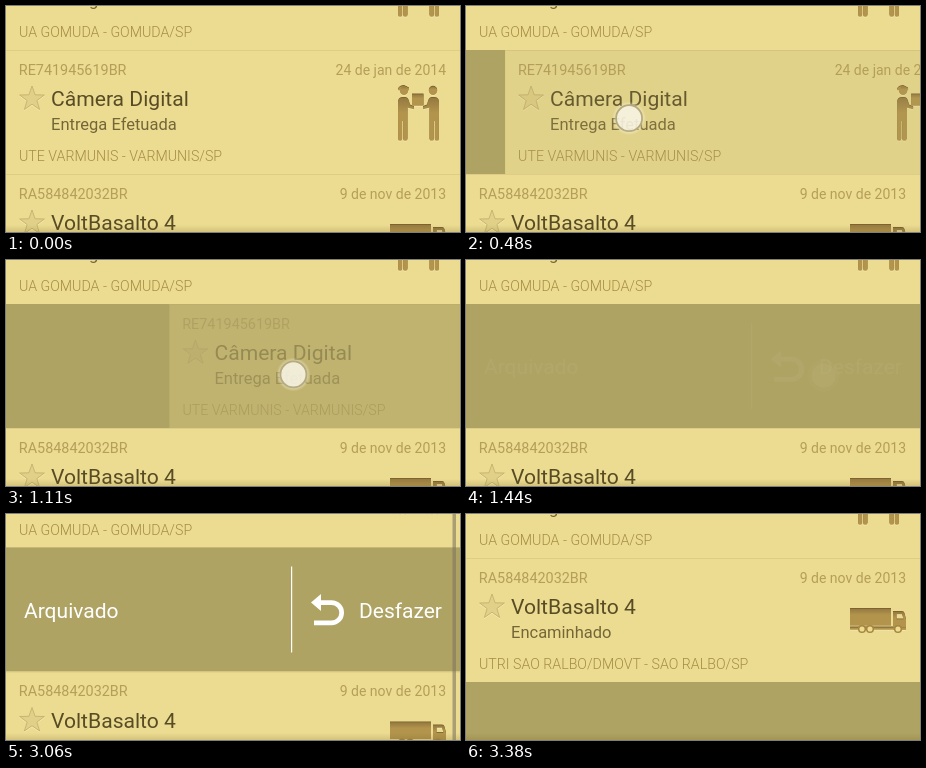
An HTML page for the animation above (3910 ms loop, 454 by 226 pixels).

```html
<!DOCTYPE html>
<html lang="pt">
<head>
<meta charset="utf-8">
<title>Arquivar encomenda</title>
<style>
  html, body { margin: 0; width: 100%; height: 100%; overflow: hidden; background: #afa364; }
  svg { display: block; width: 454px; height: 226px; font-family: Roboto, "Noto Sans", sans-serif; }
  .small { font-size: 14px; fill: #b59e58; }
  .code { font-size: 14.4px; }
  .place { font-size: 14.2px; font-weight: 300; fill: #a78d44; }
  .title { font-size: 21.1px; fill: #584c25; }
  .sub { font-size: 16.5px; fill: #746636; }
  .bar { font-size: 21px; fill: #fff; }
  .end { text-anchor: end; }
</style>
</head>
<body>
<svg viewBox="0 0 454 226">
  <defs>
    <radialGradient id="glow">
      <stop offset=".78" stop-color="#fffbe0" stop-opacity=".45"/>
      <stop offset="1" stop-color="#fffbe0" stop-opacity="0"/>
    </radialGradient>
    <linearGradient id="shade" x2="0" y2="1">
      <stop offset="0" stop-color="#6b5a1c" stop-opacity="0"/>
      <stop offset="1" stop-color="#6b5a1c" stop-opacity=".2"/>
    </linearGradient>
    <linearGradient id="face" x2="0" y2="1">
      <stop offset="0" stop-color="#957940"/>
      <stop offset=".35" stop-color="#b2944c"/>
    </linearGradient>
    <g id="person">
      <circle cx="398" cy="40" r="4.2"/>
      <path d="M392 52q0-5 5-5h2q3 0 4 4l1 3.500 4 1.500v2.500l-6-1.500-.5-1v32.500q0 1.500-2.200 1.500t-2.200-1.500v-18h-1v18q0 1.500-2 1.500t-2-1.500z"/>
    </g>
    <g id="people">
      <path d="M392 38.500q1.500-3.500 6-3.500l5 2.500v2h-11z"/>
      <use href="#person"/>
      <use href="#person" transform="matrix(-1 0 0 1 825 0)"/>
      <path d="M406 43.500h11.500v11.500h-11.500z"/>
    </g>
    <g id="truck">
      <path d="M384 50h41v17h-41z"/>
      <path fill-rule="evenodd" d="M427 53h9q2 0 2.500 2l1.500 6v10h-13zM430.500 55.500v5h7l-1.500-5z"/>
      <path d="M384 68.500h56v2.500h-56z"/>
    </g>
    <path id="arrow" d="M305 55l10-8.500v6.200h10.500a11.300 11.300 0 0 1 0 25h-17.500v-4.700h17.500a7.800 7.800 0 0 0 0-15.600h-10.500v6z"/>
    <clipPath id="slotClip"><rect id="slotBox" width="454" height="124"/></clipPath>
  </defs>

  <g id="above"></g>
  <g id="slot">
    <g clip-path="url(#slotClip)">
      <rect width="454" height="124" fill="#afa364"/>
      <g id="undo">
        <text class="bar" x="18" y="70">Arquivado</text>
        <rect x="285" y="19" width="1.200" height="86" fill="#fff"/>
        <use href="#arrow" fill="#fff"/>
        <text class="bar end" x="436" y="70">Desfazer</text>
      </g>
      <g id="card"></g>
    </g>
  </g>
  <g id="below"></g>

  <rect y="219" width="454" height="7" fill="url(#shade)"/>
  <rect id="thumb" x="446.500" width="3.500" height="226" fill="#7d775f"/>
  <g id="touch">
    <circle r="17" fill="url(#glow)"/>
    <circle r="13" fill="#f6f2e4" fill-opacity=".8" stroke="#b5aa80" stroke-width="1.800"/>
  </g>
</svg>

<script>
const LOOP = 3910, FIRST = 90, STEP = 78, WIDTH = 454, ROW = 124;
const SCROLL = 3054, DONE = 3366;
const $ = id => document.getElementById(id);

function star(cx, cy, r) {
  const pts = [];
  for (let i = 0; i < 10; i++) {
    const a = i * Math.PI / 5 - Math.PI / 2, q = i % 2 ? r * .4 : r;
    pts.push((cx + q * Math.cos(a)).toFixed(1) + ',' + (cy + q * Math.sin(a)).toFixed(1));
  }
  const shape = `<polygon points="${pts.join(' ')}" `;
  return shape + 'transform="translate(0 1)" fill="none" stroke="#f4e8ab"/>' +
    shape + 'fill="#e1d087" stroke="#c1ac69" stroke-width=".8"/>';
}

// Engraved look: light lower rim, dark upper rim, shaded face.
function engraved(id) {
  const layer = (y, fill) => `<use href="#${id}" y="${y}" fill="${fill}"/>`;
  return layer(1.5, '#f5e9ae') + layer(0, '#755c2a') + layer(.8, 'url(#face)');
}

const wheels = [396, 404, 432].map(x =>
  `<circle cx="${x}" cy="71" r="3.300" fill="#ecdc92" stroke="#a5863f" stroke-width="1.500"/>`).join('');

function row(code, date, title, status, place, icon) {
  return `<rect width="${WIDTH}" height="${ROW}" fill="#ecdc92"/>
    <rect width="${WIDTH}" height="1" fill="#decd84"/>
    <text class="small code" x="12.800" y="24.500">${code}</text>
    <text class="small end" x="440" y="24.500">${date}</text>
    ${star(26, 49, 13)}
    <text class="title" x="45" y="56">${title}</text>
    <text class="sub" x="45" y="80">${status}</text>
    <text class="place" x="13" y="111">${place}</text>
    ${engraved(icon)}${icon === 'truck' ? wheels : ''}`;
}

$('above').innerHTML = row('', '', '', 'Entrega Efetuada', 'UA GOMUDA - GOMUDA/SP', 'people');
$('card').innerHTML = row('RE741945619BR', '24 de jan de 2014', 'Câmera Digital',
  'Entrega Efetuada', 'UTE VARMUNIS - VARMUNIS/SP', 'people');
$('below').innerHTML = row('RA584842032BR', '9 de nov de 2013', 'VoltBasalto 4',
  'Encaminhado', 'UTRI SAO RALBO/DMOVT - SAO RALBO/SP', 'truck');

const ramp = (t, from, to) => Math.min(1, Math.max(0, (t - from) / (to - from)));
const smooth = p => p * p * (3 - 2 * p);
const move = (id, x, y) => $(id).setAttribute('transform', `translate(${x} ${y})`);
const fade = (id, v) => $(id).setAttribute('opacity', v);

// The finger drags slowly, gaining a little speed.
function swipe(t) {
  const s = Math.max(0, t - 258);
  return .17 * s + 2.74e-5 * s * s;
}

function draw(time) {
  // The picture is held for one step at a time.
  const t = time < FIRST ? 0 : FIRST + Math.floor((time - FIRST) / STEP) * STEP;
  const dx = swipe(t);
  const left = t < SCROLL ? 0 : 1 - ramp(t, SCROLL, DONE);
  const y = -10.5 * left;
  const height = ROW * (1 - smooth(ramp(t, SCROLL, DONE)));

  move('above', 0, y - 80);
  move('slot', 0, y + 44);
  move('below', 0, y + 44 + height);
  $('slotBox').setAttribute('height', height);
  move('card', dx, 0);
  fade('card', Math.max(0, 1 - 2 * dx / WIDTH));
  fade('undo', ramp(t, 1400, 1880) * (1 - ramp(t, SCROLL, 3210)));
  fade('thumb', .6 * left);
  move('touch', 124 + dx, 111.5 + dx * .018);
  fade('touch', t < FIRST ? 0 : 1 - ramp(t, 1182, 1430));
}

const start = performance.now();
function tick() {
  draw((performance.now() - start) % LOOP);
  requestAnimationFrame(tick);
}
tick();
</script>
</body>
</html>
```
